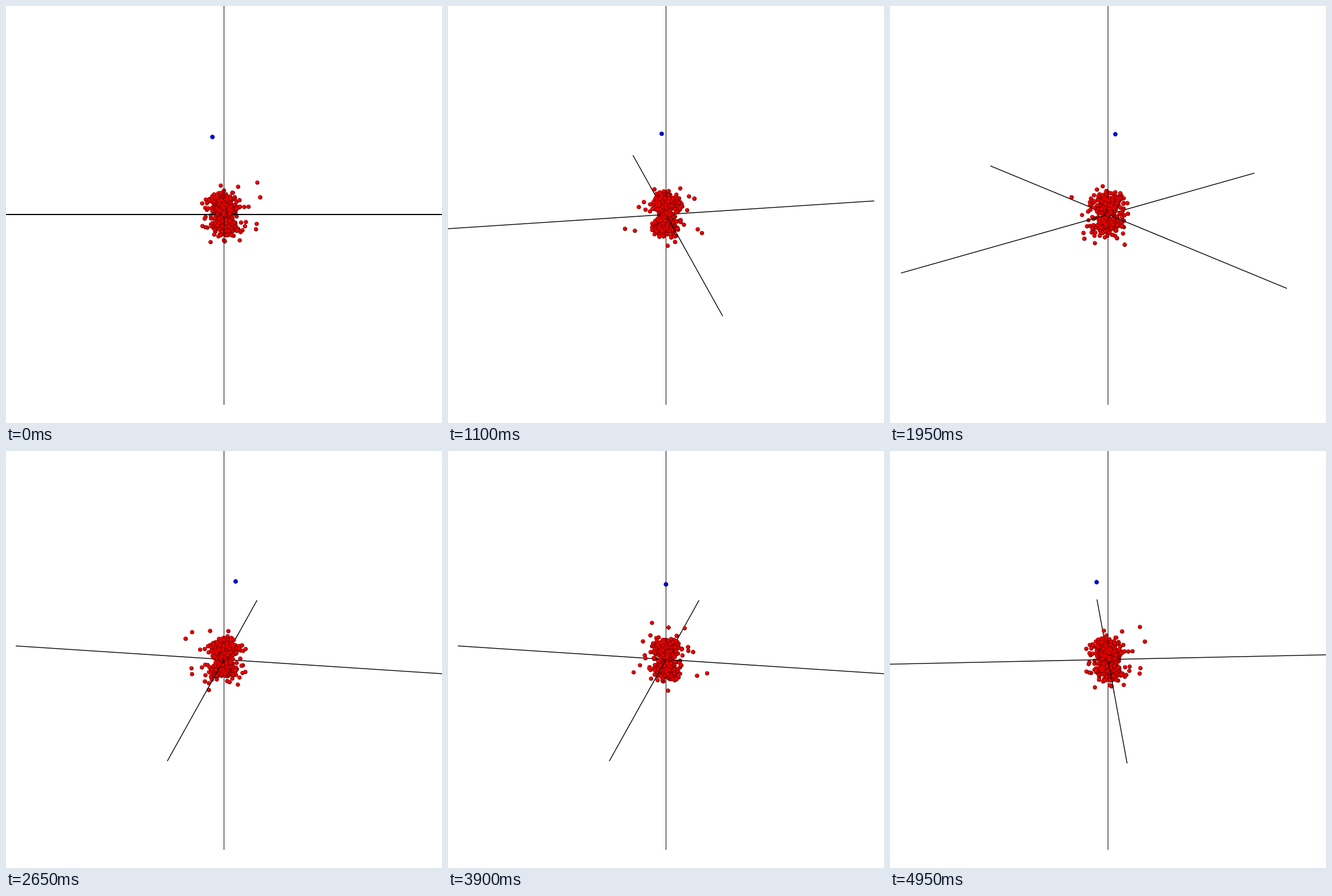
Recreate the animation shown at these times as a matplotlib script. Size 765 by 732 pixels, loop 5000 ms.

```python
import numpy as np
import matplotlib.pyplot as plt
from matplotlib.animation import FuncAnimation
from matplotlib.collections import PolyCollection

W, H, DPI = 765, 732, 100
FRAMES, INTERVAL = 100, 50

# Camera: 30 degree lens, raised 20 degrees, looking at the origin
FOCAL = H / 2 / np.tan(np.radians(15))
DIST = 3.5
SIN_E, COS_E = np.sin(np.radians(20)), np.cos(np.radians(20))
UNIT = FOCAL / DIST            # pixels per world unit at the origin

BALL = 0.0096
LINE_WIDTH = 1.4
SIDES = 14
# Shading of a ball: disc radius, shift towards the light, brightness
LAYERS = [(1.0, 0.0, 0.44), (0.89, 0.075, 0.66), (0.74, 0.16, 0.84), (0.54, 0.22, 0.95)]

# Far electrons: radius and height in pixels, azimuth in degrees
OUTER = [
    (70, 122, 44), (66, 70, 37), (58, 94, -18), (57, 95, -28),
    (73, 1, -20), (55.5, 0, -25), (63.6, 167, -32), (57, 156, -21.6),
    (24.5, 90, 48), (43, 88, 14), (28, 85, -45), (27, 192, 42),
    (25, -71, -46), (38, -87, 20), (38, -88, -20), (33, -88, -22),
    (39, 97, -15), (33, 95, -29), (48, 0, 16), (39, 0, 24),
    (41, 180, 29), (38, 180, 5), (20, -12, 43.5),
]


def core_cloud(count, scale=5.6, limit=43):
    """Random points of a 2p orbital: two lobes along the vertical axis."""
    rng = np.random.default_rng(12)
    r = rng.gamma(5, scale, 3 * count)
    r = r[r < limit][:count] / UNIT
    u = np.cbrt(rng.uniform(-1, 1, count))
    return r * np.sqrt(1 - u * u), rng.uniform(0, 2 * np.pi, count), r * u


def outer_cloud():
    rho, azimuth, rise = np.array(OUTER).T
    return rho / UNIT, np.radians(azimuth), rise / COS_E / UNIT


def project(rho, azimuth, height, turn):
    """Screen x, y and nearness of points turned about the vertical axis."""
    x = rho * np.sin(azimuth - turn)
    z = rho * np.cos(azimuth - turn)
    near = height * SIN_E + z * COS_E
    scale = FOCAL / (DIST - near)
    return W / 2 + x * scale, H / 2 - (height * COS_E - z * SIN_E) * scale, near


core, outer = core_cloud(400), outer_cloud()
blue = ([0.0507], [np.radians(280.8)], [0.3604])
points = [np.concatenate(parts) for parts in zip(core, outer, blue)]
n_balls = len(points[0])

base = np.tile([1.0, 0.0, 0.0], (n_balls, 1))
base[-1] = 0, 0, 0.95

# Axis arms, cut finely near the centre so that balls can hide them
cuts = np.append(np.linspace(0, 0.4, 41), 1.0)
arms = [(cuts, np.full_like(cuts, k * np.pi / 2), 0 * cuts) for k in range(4)]
arms += [(0 * cuts, 0 * cuts, cuts), (0 * cuts, 0 * cuts, -cuts)]

corner = np.linspace(0, 2 * np.pi, SIDES, endpoint=False)
circle = np.column_stack([np.cos(corner), np.sin(corner)])
pad = np.minimum(np.arange(SIDES), 3)


def ball_polys(turn):
    x, y, near = project(*points, turn)
    size = BALL * FOCAL / (DIST - near)
    center = np.column_stack([x, y])
    discs = [center[:, None] + size[:, None, None] * (circle * r - s)
             for r, s, _ in LAYERS]
    colors = [base * shade for *_, shade in LAYERS]
    return np.concatenate(discs), np.concatenate(colors), np.tile(near, len(LAYERS))


def arm_polys(arm, turn):
    x, y, near = project(*arm, turn)
    p = np.column_stack([x, y])
    step = np.diff(p, axis=0)
    length = np.maximum(np.hypot(*step.T), 1e-6)[:, None]
    along = step / length * 0.3
    side = step[:, ::-1] * [-1, 1] / length * LINE_WIDTH / 2
    start, end = p[:-1] - along, p[1:] + along
    quads = np.stack([start + side, end + side, end - side, start - side], axis=1)
    return quads[:, pad], np.zeros((len(quads), 3)), (near[:-1] + near[1:]) / 2


fig = plt.figure(figsize=(W / DPI, H / DPI), dpi=DPI, facecolor="white")
ax = fig.add_axes([0, 0, 1, 1])
ax.set_xlim(0, W)
ax.set_ylim(H, 0)
ax.axis("off")
scene = PolyCollection([], edgecolors="none", linewidths=0)
ax.add_collection(scene, autolim=False)


def draw(i):
    turn = 2 * np.pi * i / FRAMES
    parts = [ball_polys(turn)] + [arm_polys(arm, turn) for arm in arms]
    verts, colors, near = (np.concatenate(group) for group in zip(*parts))
    order = np.argsort(near, kind="stable")
    scene.set_verts(verts[order])
    scene.set_facecolor(colors[order])
    return (scene,)


anim = FuncAnimation(fig, draw, frames=FRAMES, interval=INTERVAL,
                     init_func=lambda: draw(0), repeat=True, repeat_delay=0)
plt.show()
```
